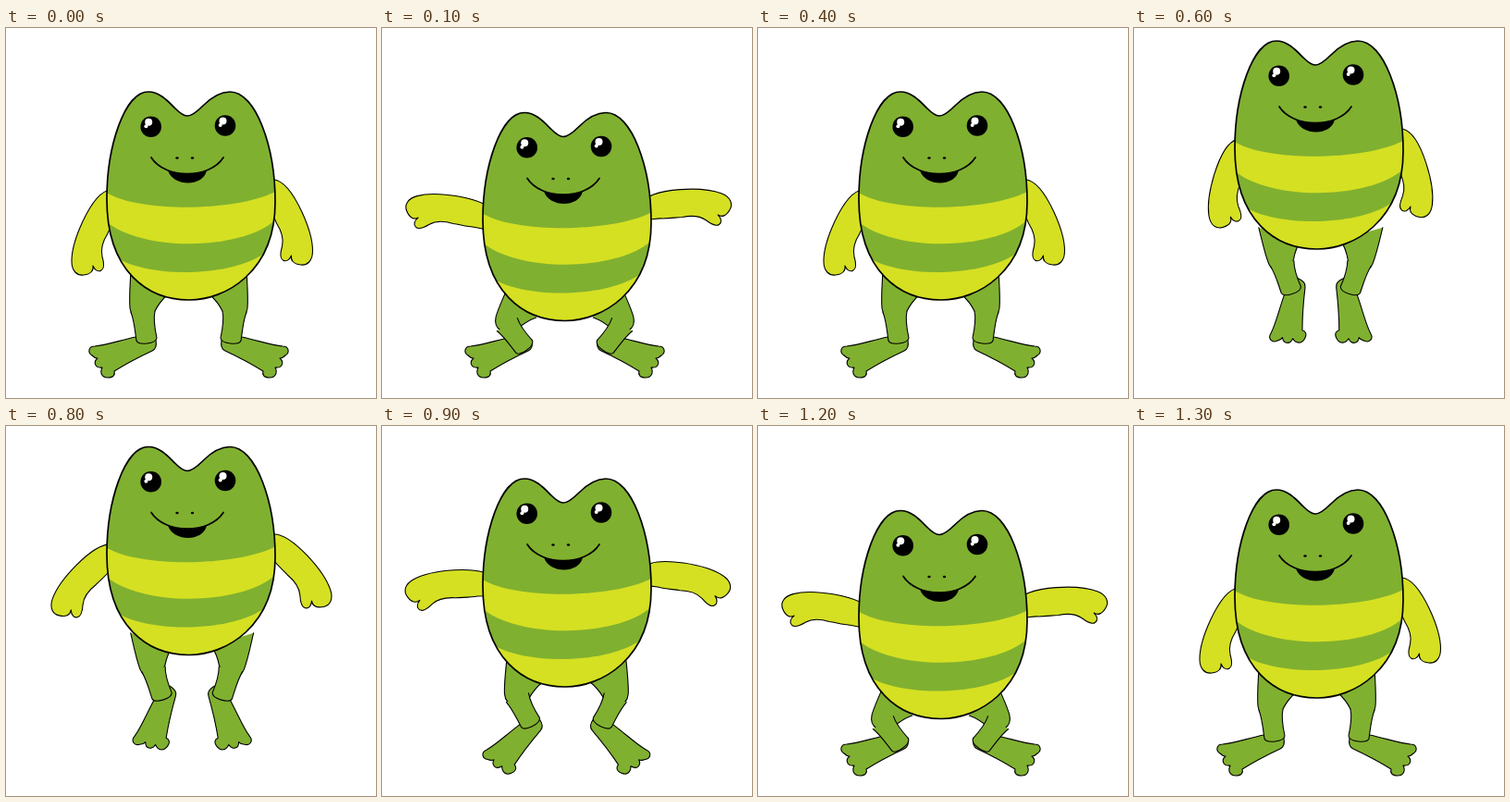
An HTML page with a canvas for the animation above (1.9 s loop, 400x400 px).

```html
<!DOCTYPE html>
<html lang="en">
<head>
<meta charset="utf-8">
<title>Jumping frog</title>
<style>
  html, body { margin: 0; width: 100%; height: 100%; overflow: hidden; background: #fff; }
  canvas { display: block; width: 100vw; height: 100vh; }
</style>
</head>
<body>
<canvas id="stage" width="400" height="400"></canvas>
<script>
const ctx = document.getElementById('stage').getContext('2d');
const GREEN = '#80b030', YELLOW = '#d5e022';
const LOOP = 1900, STEP = 100;

// Every part is drawn once in the standing pose and turned about its joint
const BODY = new Path2D(`M154 69 C166 69 175 79 183 87 C188 92 192 95 196 95
  C201 95 207 90 213 84 C221 76 230 69 242 69 C270 69 291 128 291 188
  C291 264 237 294 198 294 C154 294 109 264 109 185 C109 128 128 69 154 69Z`);
const STRIPES = new Path2D(`M107 177 C140 199.5 250 199.5 293 176 L293 206
  C256 242 144 242 107 208Z M118 247 C150 270 240 270 277 245 L277 300 L118 300Z`);
const SMILE = new Path2D('M157 140 C172 163.5 220 163.5 235 140');
const MOUTH = new Path2D('M175 154 Q196 161 217 154 C213 172 181 172 175 154Z');
const ARM = new Path2D(`M113 175 C102 176 92 190 83 209 C76 224 71 240 71 252
  C71 263 77 268 84 267 C92 266 95 262 94 257 C96 262 100 264 103 262
  C107 260 106 254 104 247 C102 239 105 230 110 222 C113 215 117 209 120 200
  L124 192 L128 170`);
const THIGH = new Path2D(`M135 262 C134 280 133 292 134 303 C136 316 150 320 161 306
  C164 300 168 294 175 288`);
const SHIN = new Path2D(`M161 306 C159 316 161 326 163 335 C162 342 143 343 141 338
  C139 325 139 318 135 307`);
const FOOT = new Path2D(`M150 331 L140 334 C122 338 108 343 96 344 C89 344 88 351 93 354
  C95 356 97 357 99 357 C94 361 96 368 104 367 C101 373 104 378 110 378
  C117 378 118 374 117 371 C125 366 141 357 158 349 C162 347 163 344 162 337`);
const SHOULDER = [115, 184], HIP = [164, 267], KNEE = [148, 306], ANKLE = [148.5, 332];

// Body offset and joint angles in degrees
const pose = (y, arm, thigh, shin, foot) => ({ y, arm, thigh, shin, foot });
const stand = pose(0, 0, 0, 0, 0);
const squat = pose(22.5, 75, 21, -30, 0);
const flap = { ...squat, arm: 103 };
const rise = pose(-55, -8, -17, -11, -58);
const peak = pose(-62, 6, -17, -11, -55);
const fall = pose(-46.5, 20, -16, -10, -49);

// Key poses by step; the steps between are blended
const KEYS = [[0, stand], [1, squat], [2, flap], [3, squat], [4, stand], [6, rise],
  [7, peak], [8, fall], [10, flap], [12, squat], [13, stand]];

function poseAt(step) {
  const next = KEYS.findIndex(([at]) => at >= step);
  if (next < 0) return stand;
  const [end, b] = KEYS[next];
  if (end === step) return b;
  const [begin, a] = KEYS[next - 1];
  const k = (step - begin) / (end - begin);
  const out = {};
  for (const key in a) out[key] = a[key] + (b[key] - a[key]) * k;
  return out;
}

const radians = deg => deg * Math.PI / 180;

// Where a child joint lands when its parent, placed at `at`, turns by deg
function follow(at, deg, parent, child) {
  const c = Math.cos(radians(deg)), s = Math.sin(radians(deg));
  const dx = child[0] - parent[0], dy = child[1] - parent[1];
  return [at[0] + dx * c - dy * s, at[1] + dx * s + dy * c];
}

function scoped(draw) {
  ctx.save();
  draw();
  ctx.restore();
}

function limb(path, fill, at, deg, joint) {
  scoped(() => {
    ctx.translate(...at);
    ctx.rotate(radians(deg));
    ctx.translate(-joint[0], -joint[1]);
    ctx.fillStyle = fill;
    ctx.fill(path);
    ctx.stroke(path);
  });
}

function drawLeg(p) {
  const hip = [HIP[0], HIP[1] + p.y];
  const knee = follow(hip, p.thigh, HIP, KNEE);
  const ankle = follow(knee, p.shin, KNEE, ANKLE);
  ankle[1] = Math.min(ankle[1], ANKLE[1]); // the floor stops the foot
  limb(FOOT, GREEN, ankle, p.foot, ANKLE);
  limb(THIGH, GREEN, hip, p.thigh, HIP);
  limb(SHIN, GREEN, knee, p.shin, KNEE);
}

function mirrored(sum, dy, draw) {
  scoped(() => {
    ctx.transform(-1, 0, 0, 1, sum, dy);
    draw();
  });
}

function dot(x, y, rx, color, ry = rx) {
  ctx.fillStyle = color;
  ctx.beginPath();
  ctx.ellipse(x, y, rx, ry, 0, 0, Math.PI * 2);
  ctx.fill();
}

function drawEye(x, y) {
  dot(x, y, 11.3, '#000');
  dot(x - 2.5, y - 5, 4, '#fff');
  dot(x - 5.3, y - 0.5, 2, '#fff');
}

function drawBody() {
  ctx.fillStyle = GREEN;
  ctx.fill(BODY);
  scoped(() => {
    ctx.clip(BODY);
    ctx.fillStyle = YELLOW;
    ctx.fill(STRIPES);
  });
  ctx.lineWidth = 1.7;
  ctx.stroke(BODY);
  ctx.stroke(SMILE);
  ctx.fillStyle = '#000';
  ctx.fill(MOUTH);
  drawEye(156.7, 106.7);
  drawEye(237, 105.5);
  dot(185, 140.5, 1.7, '#000', 1.2);
  dot(201.5, 140.5, 1.7, '#000', 1.2);
}

function render(time) {
  const p = poseAt(Math.min(13, Math.floor(time % LOOP / STEP)));
  ctx.fillStyle = '#fff';
  ctx.fillRect(0, 0, 400, 400);
  ctx.strokeStyle = '#000';
  ctx.lineWidth = 1.1;
  ctx.lineCap = ctx.lineJoin = 'round';
  drawLeg(p);
  mirrored(395 - p.foot * 0.15, 0, () => drawLeg(p));
  scoped(() => {
    ctx.translate(0, p.y);
    limb(ARM, YELLOW, SHOULDER, p.arm, SHOULDER);
    mirrored(402.5, -11, () => limb(ARM, YELLOW, SHOULDER, p.arm * 0.92, SHOULDER));
    drawBody();
  });
}

const start = performance.now();
function tick() {
  render(performance.now() - start);
  requestAnimationFrame(tick);
}
tick();
</script>
</body>
</html>
```
